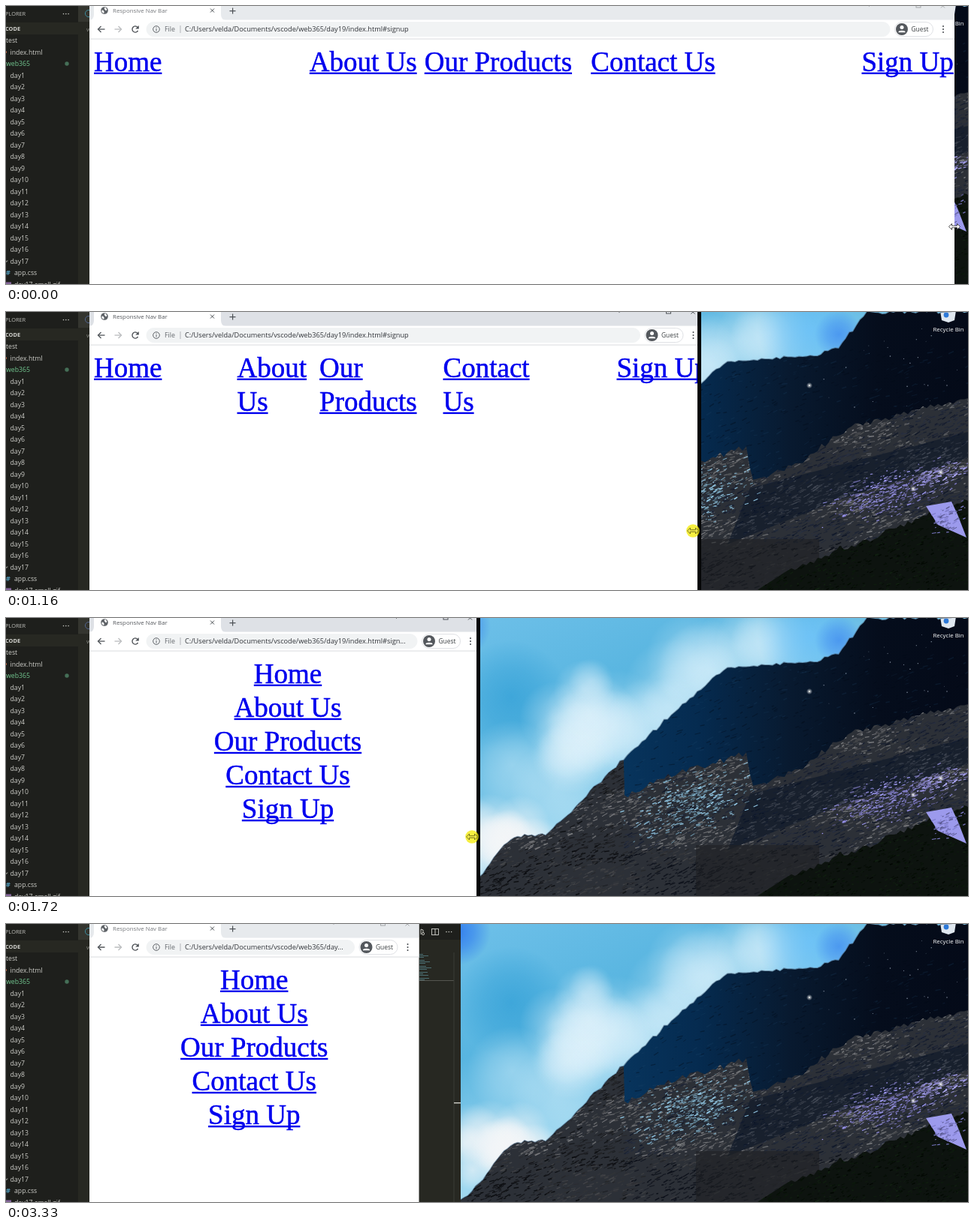
Write an HTML page with a canvas that moves like this. It is 1280 by 371 pixels and loops after 3480 ms.

```html
<!DOCTYPE html>
<html lang="en">
<head>
<meta charset="utf-8">
<title>Responsive Nav Bar</title>
<style>
html, body { margin: 0; width: 100%; height: 100%; overflow: hidden; background: #272822; }
canvas { display: block; width: 1280px; height: 371px; }
</style>
</head>
<body>
<canvas id="stage" width="1280" height="371"></canvas>
<script>
const W = 1280, H = 371, LOOP = 3480, LEFT = 111;
const DRAG = 400, DROP = 2000, BLUR = 3330;
const ctx = document.getElementById('stage').getContext('2d');
const UI = '"Open Sans", "Noto Sans", sans-serif';
const SERIF = '"Liberation Serif", serif';
const PATH = 'C:/Users/velda/Documents/vscode/web365/day19/index.html#signup';

// drag step, window edge, how far toolbar and page trail behind it
const KEYS = [
  [-3, 1258, 4, 4],
  [0, 1200, 16, 15],
  [5, 1037, 5, 9],
  [11, 803, 14, 23],
  [16, 626, 7, 13],
  [20, 549.5, 0, 0]
];

function pose(t) {
  if (t < DRAG) return { win: 1262, bar: 1262, page: 1262, x: 1262, y: 294.5 };
  const step = t < DROP ? Math.floor((t - 590) / 70) : 20;
  const i = Math.max(1, KEYS.findIndex(k => k[0] >= step));
  const a = KEYS[i - 1], b = KEYS[i], k = (step - a[0]) / (b[0] - a[0]);
  const [win, bar, page] = [1, 2, 3].map(n => a[n] + (b[n] - a[n]) * k);
  return { win, bar: win + bar, page: win + page, x: t < 1990 ? win - 6 : win, y: 292 };
}

function rect(g, x, y, w, h, color) {
  g.fillStyle = color;
  g.fillRect(x, y, w, h);
}
function disc(g, x, y, r, color) {
  g.fillStyle = color;
  g.beginPath();
  g.arc(x, y, r, 0, 7);
  g.fill();
}
function trace(g, pts) {
  g.beginPath();
  for (let i = 0; i < pts.length; i += 2) g.lineTo(pts[i], pts[i + 1]);
}
function poly(g, pts, color) {
  trace(g, pts);
  g.closePath();
  g.fillStyle = color;
  g.fill();
}
function line(g, pts, color, width = 1) {
  trace(g, pts);
  g.strokeStyle = color;
  g.lineWidth = width;
  g.stroke();
}
function ring(g, x, y, r, color, width = 1, from = 0, to = 2 * Math.PI) {
  g.beginPath();
  g.arc(x, y, r, from, to);
  g.strokeStyle = color;
  g.lineWidth = width;
  g.stroke();
}
function cross(x, y, r, color) {
  line(ctx, [x - r, y - r, x + r, y + r], color);
  line(ctx, [x - r, y + r, x + r, y - r], color);
}
function pill(x, y, w, fill, edge) {
  ctx.beginPath();
  ctx.roundRect(x, y, w, 19, 9.5);
  ctx.fillStyle = fill;
  ctx.fill();
  ctx.strokeStyle = edge;
  ctx.lineWidth = 1;
  ctx.stroke();
}
function label(s, x, y, size, color, align = 'left', weight = 400) {
  ctx.font = `${weight} ${size}px ${UI}`;
  ctx.textAlign = align;
  ctx.fillStyle = color;
  ctx.fillText(s, x, y + size * 0.36);
}
function gradient(g, x0, y0, x1, y1, ...colors) {
  const f = g.createLinearGradient(x0, y0, x1, y1);
  colors.forEach((c, i) => f.addColorStop(i / (colors.length - 1), c));
  return f;
}
function random(seed) {
  return () => (seed = (seed * 16807) % 2147483647) / 2147483647;
}

function paintWallpaper() {
  const c = document.createElement('canvas');
  c.width = W;
  c.height = H;
  const g = c.getContext('2d'), rnd = random(77);
  const spread = s => (rnd() + rnd() + rnd() - 1.5) * s;

  const glow = (x, y, r, rgb, a) => {
    const f = g.createRadialGradient(x, y, 0, x, y, r);
    f.addColorStop(0, `rgba(${rgb},${a})`);
    f.addColorStop(0.5, `rgba(${rgb},${a * 0.6})`);
    f.addColorStop(1, `rgba(${rgb},0)`);
    rect(g, x - r, y - r, 2 * r, 2 * r, f);
  };
  // rough outline through a few points, closed along the bottom
  const crest = (pts, rough) => {
    const out = [];
    for (let i = 0; i < pts.length - 2; i += 2) {
      const [x0, y0, x1, y1] = pts.slice(i, i + 4), n = Math.ceil((x1 - x0) / 5);
      for (let j = 0; j < n; j++) {
        const k = j / n;
        out.push(x0 + (x1 - x0) * k, y0 + (y1 - y0) * k + spread(rough));
      }
    }
    return [...out, W, pts[pts.length - 1], W, H, 605, H];
  };
  const clipTo = pts => {
    trace(g, pts);
    g.clip();
  };
  const streak = (x, y, len, color) =>
    line(g, [x, y, x + len, y - len * (0.1 + rnd() * 0.6)], color, 0.6 + rnd());
  const glints = (n, x, y, sx, sy, r, gr, b) => {
    for (let i = 0; i < n; i++) {
      const dx = spread(sx), v = 0.55 + rnd() * 0.5;
      streak(x + dx, y + spread(sy) - dx * 0.25, 1 + rnd() * 5, `rgb(${r * v},${gr * v},${b * v})`);
    }
  };

  // sky, with a bank of cloud that brightens towards the ridge
  rect(g, 600, 0, 680, H, gradient(g, 640, 0, 760, 280, '#6cbfe8', '#58b5e0', '#9fd8f0'));
  glow(672, 105, 75, '42,155,212', 0.6);
  glow(600, 10, 45, '45,120,240', 0.9);
  for (let i = 0; i < 22; i++) {
    const k = i / 21;
    glow(715 + k * 300 + spread(35), 205 - k * 175 + spread(30), 38 + rnd() * 35, '212,238,250', 0.42);
  }
  for (let i = 0; i < 9; i++) glow(760 + spread(60), 150 + spread(75), 30 + rnd() * 22, '228,243,251', 0.38);
  for (let i = 0; i < 14; i++) glow(640 + spread(55), 300 + spread(40), 26 + rnd() * 24, '244,246,248', 0.6);
  glow(1070, 25, 70, '110,195,250', 0.8);
  glow(1108, 30, 32, '60,135,240', 0.7);

  const ridge = crest([605, 371, 640, 335, 663, 300, 690, 289, 718, 291, 822, 188, 905, 112,
    960, 67, 1075, 58, 1108, 48, 1146, 0, 1280, 0], 3);
  line(g, ridge.slice(0, -8), 'rgba(70,95,120,.6)', 2);
  poly(g, ridge, gradient(g, 800, 0, W, 0, '#08365f', '#052b50', '#081a30', '#050d1c', '#040a18'));
  clipTo(ridge);
  for (let i = 0; i < 700; i++) {
    streak(822 + rnd() * 458, 50 + rnd() * 190, 2 + rnd() * 6, rnd() < 0.6 ? 'rgba(2,10,24,.4)' : 'rgba(35,75,110,.22)');
  }

  // rocky slope: lit bands and dark gullies
  const slope = crest([605, 150, 821, 150, 823, 238, 905, 202, 985, 181, 994, 226, 1050, 205,
    1130, 150, 1280, 115], 5);
  poly(g, slope, '#2c3037');
  g.save();
  clipTo(slope);
  for (let i = 0; i < 7500; i++) {
    const x = 605 + rnd() * 675, y = 110 + rnd() * 261;
    const along = y + x * 0.33;
    const field = Math.sin(along * 0.075) + Math.sin(x * 0.021 - y * 0.06) + spread(1.6);
    const dim = y > 310 ? 0.55 : 1;
    const v = (field > 0 ? 65 + rnd() * 65 : 14 + rnd() * 28) * dim;
    const blue = x > 822 && field < 0 ? 24 * dim : 5;
    streak(x, y, 2 + rnd() * 6, `rgb(${v},${v + blue * 0.3},${v + blue})`);
  }
  poly(g, [990, 235, 1280, 160, 1280, 195, 1110, 250, 960, 310], 'rgba(5,16,36,.5)');
  rect(g, 918, 303, 164, 68, 'rgba(30,32,36,.6)');
  glints(420, 910, 248, 75, 36, 150, 205, 235);
  glints(380, 1175, 243, 75, 26, 160, 155, 245);
  glints(110, 1242, 217, 40, 12, 175, 170, 255);

  const forest = crest([1040, 345, 1150, 303, 1230, 268, 1280, 252], 5);
  clipTo([...forest.slice(0, -2), 1000, H]);
  rect(g, 1000, 240, 280, 131, '#0d130f');
  for (let i = 0; i < 1300; i++) {
    const v = rnd() * 30, x = 1000 + rnd() * 280;
    streak(x, 245 + rnd() * 126, 1 + rnd() * 4, `rgb(${v * 0.6},${v + 5},${v * 0.6})`);
  }
  g.restore();
  poly(g, [1224, 259, 1258, 253, 1266, 270, 1278, 301, 1240, 284], '#9c9aec');
  glints(70, 1250, 274, 22, 18, 140, 138, 225);

  for (let i = 0; i < 30; i++) disc(g, 1050 + rnd() * 230, 20 + rnd() * 110, 0.3 + rnd() * 0.5, '#8794a5');
  for (const [x, y] of [[1069, 98], [707, 164], [706, 206], [1207, 236], [1244, 214]]) {
    glow(x, y, 4, '255,255,255', 0.7);
    disc(g, x, y, 0.9, '#f2f5ef');
  }
  poly(g, [1242, -8, 1265, -8, 1262, 11, 1254, 14, 1245, 11], '#dfe7ef');
  disc(g, 1251, 4, 3.4, '#2d79d8');
  return c;
}
const wallpaper = paintWallpaper();

function drawEditor(active) {
  const grey = '#ccccc7', row = n => 46 + n * 15.5;
  rect(ctx, 0, 0, 605, H, '#272822');
  rect(ctx, 0, 0, 605, 21, '#1e1f1c');
  rect(ctx, 0, 0, 96, H, '#1e1f1c');
  rect(ctx, 0, 22, 96, 16, '#272822');
  rect(ctx, 96, 0, 15, 21, '#34352f');
  for (let i = 0; i < 3; i++) {
    disc(ctx, 76.5 + i * 3.3, 10.5, 0.8, grey);
    disc(ctx, 586 + i * 3.3, 10.5, 0.8, grey);
  }
  label('PLORER', -1, 10.5, 7.4, '#bcbcb8');
  label('CODE', -1, 30.5, 7.4, '#d6d6d2', 'left', 700);
  label('test', 0, row(0), 8.7, grey);
  label('index.html', 5.5, row(1), 8.7, grey);
  rect(ctx, 0, row(1) - 1, 1, 2, '#d56d45');
  label('web365', 0, row(2), 8.7, '#73c991');
  disc(ctx, 81, row(2), 2.7, '#456f57');
  for (let d = 1; d <= 17; d++) label('day' + d, 5.5, row(d + 2), 8.7, grey);
  line(ctx, [-1, row(19) - 1, 0.7, row(19) + 1, 2, row(19) - 1], grey, 0.8);
  label('#', 0, row(20), 9, '#519aba', 'left', 700);
  label('app.css', 11, row(20), 8.7, grey);
  rect(ctx, 0, row(21) - 3, 7, 6, '#85669c');
  label('day17-small.gif', 11, row(21), 8.7, grey);

  ring(ctx, 110, 10, 4.6, active ? '#52648c' : '#3c8b9d');
  label('w', 107, 31, 8, '#83847d');

  // right end of the editor
  line(ctx, [552, 14, 552, 7, 555, 8, 555, 11], grey, 0.9);
  ring(ctx, 555, 13, 1.6, grey, 0.9);
  ctx.strokeRect(566.5, 6.5, 9, 8);
  line(ctx, [571, 6, 571, 15], grey);
  for (let i = 0; i < 18; i++) {
    if (i % 4 < 3) rect(ctx, 550, 40 + i * 2, 5 + (i * 7) % 13, 0.8, active ? '#72736c' : '#548086');
  }
  rect(ctx, 550, 75, 46, 1, '#555650');
  rect(ctx, 595.5, 38, 1, H, '#3b3c36');
  rect(ctx, 596, 238, 9, 1.5, '#c5c5be');
}

function fitPath(max) {
  ctx.font = `400 9.2px ${UI}`;
  let s = PATH, n = PATH.length;
  while (n && ctx.measureText(s).width > max) s = PATH.slice(0, --n) + '...';
  return s;
}

function drawTabs(bar, active) {
  const dark = '#4b4f54', faint = active ? '#51555a' : '#a4a7aa';
  rect(ctx, LEFT, 0, W, 19, active ? '#dee1e6' : '#e7eaed');
  ctx.fillStyle = '#fff';
  ctx.beginPath();
  ctx.moveTo(111, 19);
  ctx.quadraticCurveTo(117, 18, 117, 11);
  ctx.lineTo(117, 0);
  ctx.lineTo(286, 0);
  ctx.lineTo(286, 11);
  ctx.quadraticCurveTo(286, 18, 292, 19);
  ctx.fill();

  disc(ctx, 131, 6, 4.8, '#5f6368');
  ctx.fillStyle = '#fff';
  for (const [x, y] of [[129, 7.5], [132.5, 4]]) {
    ctx.beginPath();
    ctx.ellipse(x, y, 1.3, 2.2, -0.6, 0, 7);
    ctx.fill();
  }
  label('Responsive Nav Bar', 142, 6.2, 7.9, active ? '#55585d' : '#75787c');
  cross(274.5, 6, 2.5, dark);
  rect(ctx, 297.5, 6, 8, 1.2, dark);
  rect(ctx, 301, 2.5, 1.2, 8, dark);

  line(ctx, [bar - 116, -2, bar - 113.5, 0.5, bar - 111, -2], faint);
  ctx.strokeRect(bar - 51, -4, 6, 6);
  cross(bar - 15.5, 0, 2.5, faint);
}

function drawToolbar(bar) {
  const ink = '#505459';
  rect(ctx, LEFT, 18.5, W, 26, '#fff');
  rect(ctx, LEFT, 43.5, W, 1, '#d9dce0');
  const arrow = (x, dir, color) => {
    const tip = x + 4.5 * dir, back = x + 0.5 * dir;
    line(ctx, [x - 4.5 * dir, 31, tip, 31], color, 1.3);
    line(ctx, [back, 27, tip, 31, back, 35], color, 1.3);
  };
  arrow(127, -1, ink);
  arrow(149, 1, '#babcbe');
  ring(ctx, 172, 31, 4, ink, 1.4, 0.5, 5.6);
  poly(ctx, [176.8, 26, 176.8, 30.6, 172.2, 30.6], ink);

  pill(187, 21.5, bar - 86 - 187, '#f1f3f4', '#f1f3f4');
  ring(ctx, 200, 31, 4.3, '#5f6368');
  rect(ctx, 199.5, 30.2, 1, 3.2, '#5f6368');
  rect(ctx, 199.5, 28.2, 1, 1, '#5f6368');
  label('File', 211, 31, 8.9, '#65696e');
  rect(ctx, 231.5, 26, 1, 10, '#b3b6ba');
  label(fitPath(bar - 98 - 238), 238, 31, 9.2, '#303338');

  pill(bar - 79.5, 21.5, 51, '#fff', '#dfe1e5');
  disc(ctx, bar - 70, 31, 8, '#54585d');
  disc(ctx, bar - 70, 28.6, 2.5, '#fff');
  ctx.beginPath();
  ctx.ellipse(bar - 70, 35.2, 4.6, 2.4, 0, Math.PI, 0);
  ctx.fill();
  label('Guest', bar - 57.5, 31, 8.4, '#3c4043');
  for (let i = -1; i < 2; i++) disc(ctx, bar - 15, 31 + i * 4, 1, '#45494e');
}

function link(s, x, row, align = 'left') {
  const y = 87 + row * 45.1;
  ctx.font = `37px ${SERIF}`;
  ctx.textAlign = align;
  ctx.fillStyle = ctx.strokeStyle = '#0000ee';
  ctx.lineWidth = 0.5;
  ctx.fillText(s, x, y);
  ctx.strokeText(s, x, y);
  const w = ctx.measureText(s).width;
  ctx.fillRect(align === 'center' ? x - w / 2 : x, y + 1.6, w, 2.4);
}

function drawPage(page) {
  const items = ['Home', 'About Us', 'Our Products', 'Contact Us', 'Sign Up'];
  if (page < 652) {
    items.forEach((s, i) => link(s, (LEFT + page) / 2, i, 'center'));
    return;
  }
  // a three item group between the outer links, shrinking to its longest words
  const full = 507.5, room = page - 331;
  const group = room > 811 ? full + (room - 811) * 0.266 : Math.max(348, 109.6 + room * 0.49);
  const x = 208 + (room - group) / 2;
  link(items[0], 117, 0);
  link(items[4], page - 123.5, 0);
  if (group >= full) {
    const gap = (group - full) / 2;
    [0, 137 + gap, 342.5 + 2 * gap].forEach((dx, i) => link(items[i + 1], x + dx, 0));
  } else {
    const rest = group - Math.max(120, 165 * group / full);
    [0, rest * 0.4, rest].forEach((dx, i) =>
      items[i + 1].split(' ').forEach((word, r) => link(word, x + dx, r)));
  }
}

function drawPointer(t, x, y) {
  if (t >= 2670) return;
  if (t >= 2600) {
    const arrow = [1000, 341, 1000, 352.5, 1003, 350, 1008, 349.5, 1000, 341];
    poly(ctx, arrow, '#fff');
    line(ctx, arrow, '#111', 0.9);
    return;
  }
  const press = t >= DRAG && t < 2530;
  if (press) disc(ctx, x, y, 8.8, 'rgba(244,234,12,.78)');
  const ink = press ? '#5d5a14' : '#222', fill = press ? '#f0e94a' : '#fff';
  for (const s of [-1, 1]) {
    const half = [x, y - 1.3, x + 3.5 * s, y - 1.3, x + 3.5 * s, y - 4, x + 7.5 * s, y,
      x + 3.5 * s, y + 4, x + 3.5 * s, y + 1.3, x, y + 1.3];
    poly(ctx, half, fill);
    line(ctx, half, ink, 0.8);
  }
}

function draw(t) {
  const p = pose(t), active = t >= DRAG && t < BLUR;
  ctx.drawImage(wallpaper, 0, 0);
  label('Recycle Bin', 1254, 23, 7.9, '#fff', 'center');
  drawEditor(active);
  if (active && t < 1990) rect(ctx, p.win, 0, 5, H, '#050607');
  ctx.save();
  ctx.beginPath();
  ctx.rect(LEFT, 0, p.win - LEFT, H);
  ctx.clip();
  rect(ctx, LEFT, 0, W, H, '#fff');
  drawTabs(p.bar, active);
  drawToolbar(p.bar);
  drawPage(p.page);
  ctx.restore();
  drawPointer(t, p.x, p.y);
}

const begin = performance.now();
function tick() {
  draw((performance.now() - begin) % LOOP);
  requestAnimationFrame(tick);
}
tick();
</script>
</body>
</html>
```
